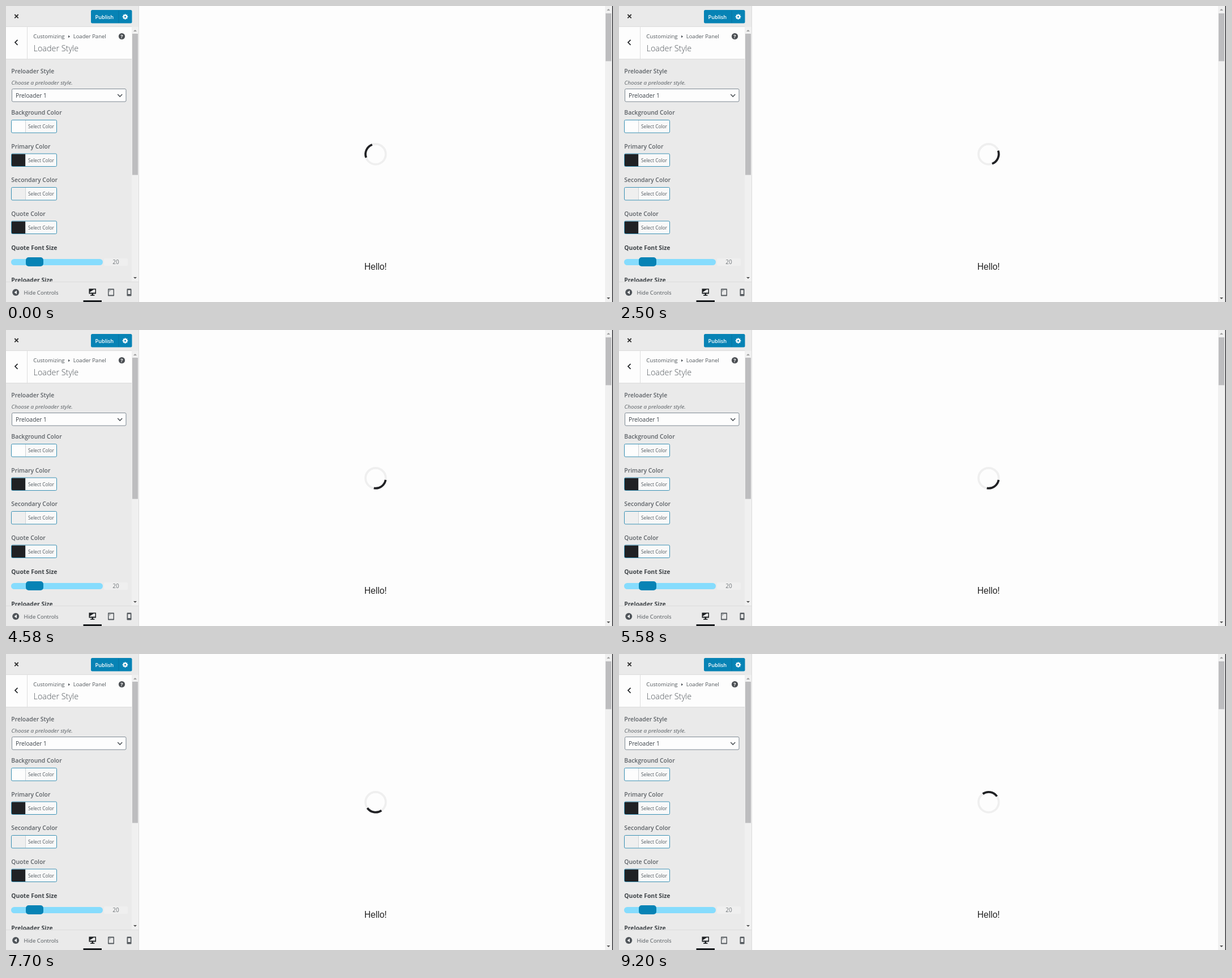
An HTML page with a canvas that plays this animation: 1072x523 px, repeating every 9.23 s.

```html
<!DOCTYPE html>
<html lang="en">
<head>
<meta charset="utf-8">
<title>Loader Style</title>
<style>
  html, body { margin: 0; width: 100%; height: 100%; overflow: hidden; background: #fdfdfd; }
  canvas { display: block; }
</style>
</head>
<body>
<canvas id="stage" width="1072" height="523"></canvas>
<script>
const ctx = document.getElementById('stage').getContext('2d');
const UI = '"Open Sans", "Noto Sans", sans-serif';
const PAPER = '#fdfdfd', PANEL = '#eaeaea', LINE = '#dcdcdc';
const BLUE = '#0783b5', INK = '#202124', GRAY = '#50565b';

const LOOP = 9230, STEP = 1000 / 24;
const SPIN = { x: 652.8, y: 261.8, r: 17.9, width: 3.7, start: 295, perStep: 15 };

function rect(x, y, w, h, fill) {
  ctx.fillStyle = fill;
  ctx.fillRect(x, y, w, h);
}

function box(x, y, w, h, r, fill, stroke) {
  ctx.beginPath();
  ctx.roundRect(x, y, w, h, r);
  if (fill) { ctx.fillStyle = fill; ctx.fill(); }
  if (stroke) { ctx.strokeStyle = stroke; ctx.lineWidth = 1; ctx.stroke(); }
}

function disc(x, y, r, fill) {
  ctx.beginPath();
  ctx.arc(x, y, r, 0, Math.PI * 2);
  ctx.fillStyle = fill;
  ctx.fill();
}

function trace(points) {
  ctx.beginPath();
  points.forEach(([x, y]) => ctx.lineTo(x, y));
}

function path(points, color, width) {
  trace(points);
  ctx.strokeStyle = color;
  ctx.lineWidth = width;
  ctx.stroke();
}

function poly(points, fill) {
  trace(points);
  ctx.fillStyle = fill;
  ctx.fill();
}

function text(str, x, y, font, color, align = 'left') {
  ctx.font = font;
  ctx.fillStyle = color;
  ctx.textAlign = align;
  ctx.fillText(str, x, y);
}

function label(str, y, color = '#5c6166', weight = 600) {
  text(str, 9.3, y, `${weight} 10.4px ${UI}`, color);
}

// Vertical scrollbar with arrows at both ends
function scrollbar(x, y, w, h, thumbY, thumbH) {
  const mid = x + w / 2;
  rect(x, y, w, h, '#f0f0f0');
  rect(x + 1, thumbY, w - 2, thumbH, '#bdbdbf');
  poly([[mid - 3, y + 8], [mid, y + 5], [mid + 3, y + 8]], '#9a9a9a');
  poly([[mid - 3, y + h - 8], [mid, y + h - 5], [mid + 3, y + h - 8]], '#505050');
}

function colorButton(y, swatch) {
  box(9.5, y + 0.5, 80, 22.5, 2, '#f9f9f9');
  rect(10, y + 1, 24, 21.5, swatch);
  rect(34, y + 1, 1, 21.5, '#cfd3d5');
  box(9.5, y + 0.5, 80, 22.5, 2, null, '#3a91b4');
  text('Select Color', 39, y + 15, `8.35px ${UI}`, '#50585e');
}

function gear(x, y) {
  ctx.save();
  ctx.translate(x, y);
  for (let i = 0; i < 8; i++) {
    ctx.rotate(Math.PI / 4);
    rect(-1, -4.8, 2, 3, '#fff');
  }
  ctx.restore();
  disc(x, y, 3.6, '#fff');
  disc(x, y, 1.5, BLUE);
}

function drawHeader() {
  path([[15.3, 15], [21.7, 21.4]], '#333', 1.8);
  path([[21.7, 15], [15.3, 21.4]], '#333', 1.8);
  box(150, 7, 72.5, 23.5, 2.5, BLUE);
  rect(198.5, 8, 1, 22, '#0675a2');
  text('Publish', 157.5, 22.5, `600 9.2px ${UI}`, '#fff');
  gear(210.5, 19);

  rect(0, 36, 222, 1, LINE);
  rect(0, 37, 222, 56.5, PAPER);
  rect(0, 93.5, 222, 1, LINE);
  rect(37, 37, 1, 57, LINE);
  path([[20.5, 59.8], [16, 64.3], [20.5, 68.8]], '#26292c', 1.8);
  text('Customizing', 48.3, 57.4, `9.65px ${UI}`, GRAY);
  poly([[110, 51.8], [113.2, 54], [110, 56.2]], GRAY);
  text('Loader Panel', 118.7, 57.4, `9.5px ${UI}`, GRAY);
  text('Loader Style', 48.5, 80, `300 14.4px ${UI}`, '#4d5358');
  disc(204.5, 53.5, 5.6, '#4b4f53');
  text('?', 204.5, 57, `700 9px ${UI}`, '#fff', 'center');
}

function drawControls() {
  label('Preloader Style', 119);
  text('Choose a preloader style.', 9.5, 138.8, `italic 9.8px ${UI}`, '#5a6065');
  box(10.5, 146.5, 201.5, 22.5, 2, PAPER, '#7e8993');
  text('Preloader 1', 17, 161.6, `10.2px ${UI}`, '#3a4148');
  path([[197.2, 156], [201.2, 160], [205.2, 156]], '#50565b', 1.6);

  label('Background Color', 192);
  colorButton(201, PAPER);
  label('Primary Color', 251.7);
  colorButton(260.5, INK);
  label('Secondary Color', 311.2);
  colorButton(320, '#efefef');
  label('Quote Color', 371);
  colorButton(379.5, INK);

  label('Quote Font Size', 430.5, '#3f4448', 700);
  box(9, 447, 162, 11, 5.5, '#86dcfd');
  box(35, 444, 31, 16, 5, BLUE);
  box(173, 446, 42, 13, 2, '#efefef');
  text('20', 194, 455.8, `10px ${UI}`, '#70767a', 'center');
  label('Preloader Size', 487.6, '#3f4448', 700);
}

function drawFooter() {
  rect(0, 487, 234, 36, PANEL);
  rect(0, 487, 234, 1, LINE);
  disc(17.2, 506, 6, '#50555a');
  poly([[19, 502.8], [14.5, 506], [19, 509.2]], '#f4f4f4');
  text('Hide Controls', 31.6, 509.6, `9.6px ${UI}`, GRAY);

  rect(136.5, 520, 32.5, 3, '#191c1f');
  rect(146.5, 499.5, 12.5, 9, '#1d2023');
  rect(148, 501, 9.5, 5.5, PANEL);
  poly([[148, 501], [155, 501], [148, 505.5]], '#1d2023');
  rect(151.5, 508, 2.5, 3, '#1d2023');
  rect(149, 510.5, 7.5, 1.5, '#1d2023');

  box(180, 499.5, 11, 13, 1, '#555a5f');
  rect(181.5, 501.5, 8, 9, PANEL);
  poly([[181.5, 501.5], [186, 501.5], [181.5, 506]], '#a5a8aa');
  box(213.5, 499.5, 8, 13, 1.2, '#555a5f');
  rect(215.3, 502, 4.4, 7, PANEL);
}

function drawStatic() {
  rect(0, 0, 1072, 523, PAPER);
  rect(0, 0, 234, 523, PANEL);
  drawHeader();
  drawControls();
  scrollbar(222, 37, 12, 450, 49, 249.5);
  drawFooter();
  rect(234, 0, 1, 523, LINE);
  scrollbar(1058, 0, 12, 523, 13, 84.5);
  rect(1070.6, 0, 1.4, 523, '#26262a');
  text('Hello!', 652.7, 466.3, '15.6px "Liberation Sans", Arial, sans-serif', '#222', 'center');
}

function ring(from, to, color) {
  ctx.beginPath();
  ctx.arc(SPIN.x, SPIN.y, SPIN.r, from, to);
  ctx.strokeStyle = color;
  ctx.lineWidth = SPIN.width;
  ctx.stroke();
}

function drawSpinner(ms) {
  const step = Math.floor((ms + 12) / STEP);
  const mid = (SPIN.start + step * SPIN.perStep - 90) * Math.PI / 180;
  rect(630, 239, 46, 46, PAPER);
  ring(0, Math.PI * 2, '#efefef');
  ring(mid - Math.PI / 4, mid + Math.PI / 4, INK);
}

const began = performance.now();
function tick() {
  drawSpinner((performance.now() - began) % LOOP);
  requestAnimationFrame(tick);
}

drawStatic();
tick();
</script>
</body>
</html>
```
